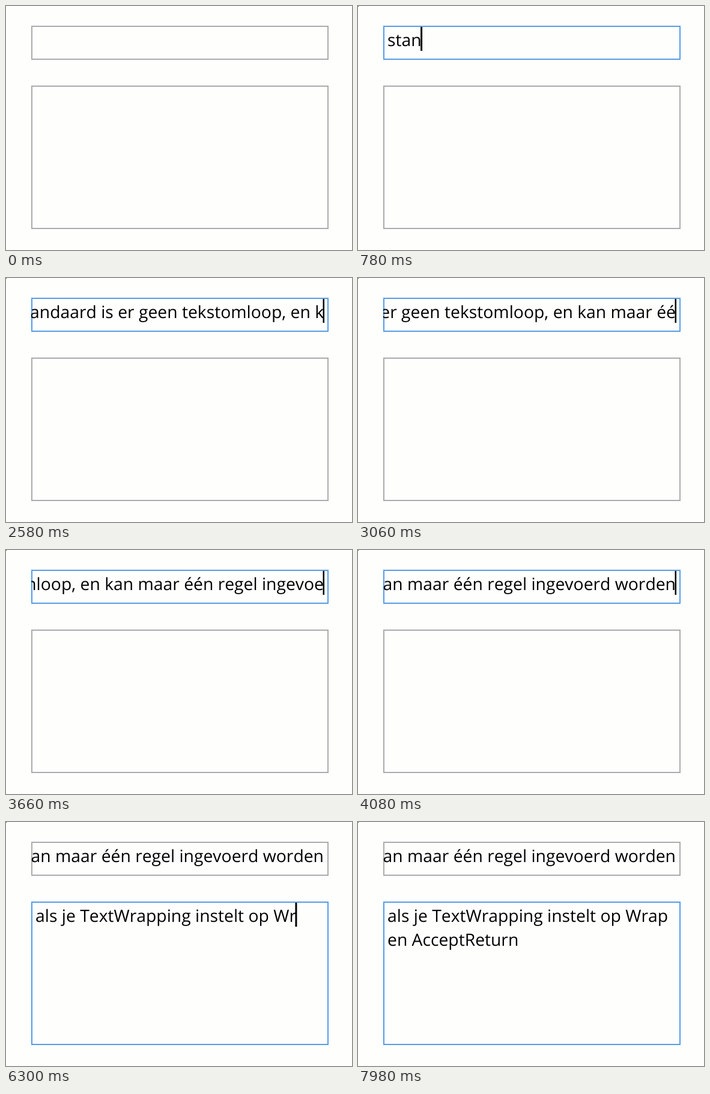
Recreate the animation shown at these times as an HTML page. Size 576 by 408 pixels, loop 8000 ms.

```html
<!DOCTYPE html>
<html lang="nl">
<head>
<meta charset="utf-8">
<title>Tekstvakken</title>
<style>
  html, body { margin: 0; width: 100%; height: 100%; overflow: hidden; background: #fefefd; }
  svg { display: block; }
  text { font: 28.3px "Open Sans", "Noto Sans", sans-serif; font-kerning: none; white-space: pre; text-rendering: geometricPrecision; }
  .box { fill: none; stroke-width: 2; }
</style>
</head>
<body>
<svg width="576" height="408" viewBox="0 0 576 408">
  <clipPath id="view"><rect x="42" y="33" width="488" height="340"/></clipPath>
  <rect id="dot" width="1" height="1"/>
  <rect id="box1" class="box" x="43" y="34" width="493" height="55"/>
  <rect id="box2" class="box" x="43" y="134" width="493" height="238"/>
  <g clip-path="url(#view)">
    <text id="single" y="67"></text>
    <text id="line1" x="49" y="167"></text>
    <text id="line2" x="49" y="207"></text>
    <rect id="caret" width="3" height="40"/>
  </g>
</svg>
<script>
const LOOP = 8000, STEP = 60;
const LEFT = 49, RIGHT = 529;
const GREY = '#ababab', HOVER = '#7eb4ea', FOCUS = '#569de5';

const SINGLE = 'standaard is er geen tekstomloop, en kan maar één regel ingevoerd worden';
const WRAPPED = 'als je TextWrapping instelt op Wrap\nen AcceptReturn';

// [time, typed characters]
const singleKeys = [[420, 0], [1020, 8], [1680, 22], [3060, 48], [3660, 63], [4060, 72]];
const wrappedKeys = [[4500, 0], [4800, 6], [5220, 10], [5820, 27], [5960, 27], [6300, 33],
  [6420, 35], [6540, 36], [6660, 36], [7620, 47], [7860, 51]];

const $ = id => document.getElementById(id);
const width = el => el.textContent ? el.getComputedTextLength() : 0;

function typed(keys, t) {
  if (t <= keys[0][0]) return keys[0][1];
  for (let i = 1; i < keys.length; i++) {
    const [t0, n0] = keys[i - 1], [t1, n1] = keys[i];
    if (t <= t1) return Math.floor(n0 + (n1 - n0) * (t - t0) / (t1 - t0) + 1e-6);
  }
  return keys[keys.length - 1][1];
}

function placeCaret(x, y) {
  $('caret').setAttribute('x', x - 1.5);
  $('caret').setAttribute('y', y);
}

function draw(time) {
  const t = Math.floor(time / STEP) * STEP;
  const second = t >= 4440;

  $('dot').style.display = t >= 60 ? '' : 'none';
  $('box1').style.stroke = t < 240 || second ? GREY : t < 360 ? HOVER : FOCUS;
  $('box2').style.stroke = second ? FOCUS : t >= 4260 ? HOVER : GREY;

  const single = $('single');
  single.textContent = SINGLE.slice(0, typed(singleKeys, t));
  const w = width(single);
  single.setAttribute('x', Math.min(LEFT, RIGHT - w));

  const [a, b] = WRAPPED.slice(0, typed(wrappedKeys, t)).split('\n');
  $('line1').textContent = a;
  $('line2').textContent = b || '';

  if (!second) placeCaret(Math.min(LEFT + w, RIGHT), 35);
  else if (b === undefined) placeCaret(LEFT + width($('line1')), 135);
  else placeCaret(LEFT + width($('line2')), 175);
  $('caret').style.display = t >= 360 && t < 7920 ? '' : 'none';
}

const start = performance.now();
function tick() {
  draw((performance.now() - start) % LOOP);
  requestAnimationFrame(tick);
}
tick();
</script>
</body>
</html>
```
